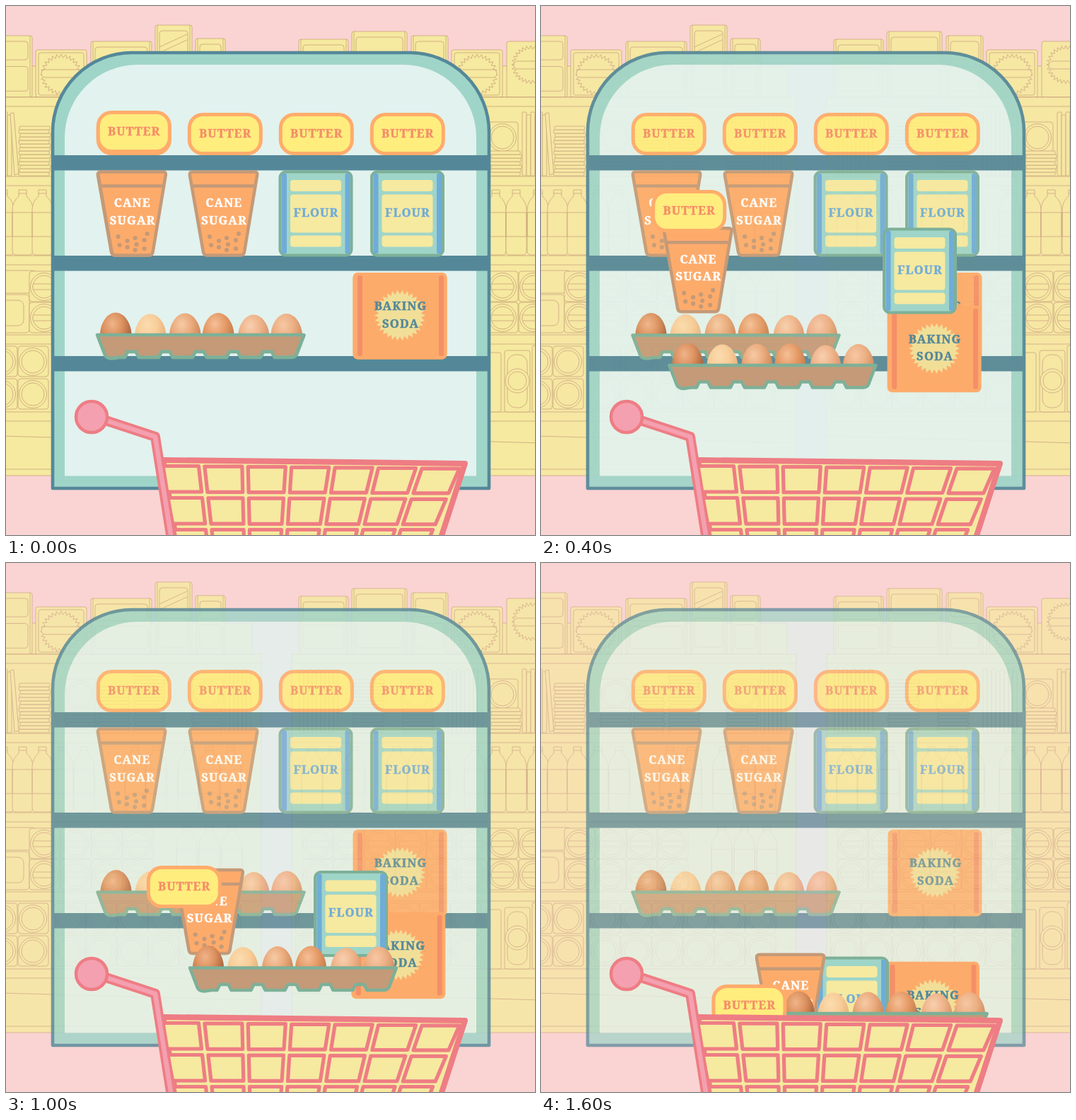
Recreate the animation shown at these times as an HTML page. Size 748 px wide and 748 px high, loop 1.7 s.

```html
<!DOCTYPE html>
<html lang="en">
<head>
<meta charset="utf-8">
<title>Baking aisle</title>
<style>
  html, body { margin: 0; height: 100%; overflow: hidden; background: #fad3d3; }
  svg { display: block; width: 748px; height: 748px; }
  text { font: bold 16.6px "Noto Serif", serif; text-anchor: middle; letter-spacing: 1.1px; stroke-width: .5; }
  .line { fill: #f6e9a0; stroke: #c9a27a; stroke-width: .8; }
</style>
</head>
<body>
<svg id="stage" viewBox="0 0 748 748"></svg>
<script>
const YELLOW = '#f6e9a0', ORANGE = '#fdab6b', TAN = '#c49a78', TEAL = '#548899',
      MINT = '#9fd5c8', GREEN = '#7db098', PINK = '#ee7d84', ROSE = '#f4a0b0';

const many = (list, draw) => list.map(draw).join('');
const range = n => [...Array(n).keys()];
const rect = (x, y, w, h, r = 3, attrs = '') =>
  `<rect x="${x}" y="${y}" width="${w}" height="${h}" rx="${r}" ${attrs}/>`;
const circle = (x, y, r, attrs = '') => `<circle cx="${x}" cy="${y}" r="${r}" ${attrs}/>`;
const path = (d, attrs = '') => `<path d="${d}" ${attrs}/>`;
const fill = (color, stroke, width) =>
  `fill="${color}"` + (stroke ? ` stroke="${stroke}" stroke-width="${width}" stroke-linejoin="round"` : '');
const label = (str, x, y, color) => `<text x="${x + .5}" y="${y + 6}" fill="${color}" stroke="${color}">${str}</text>`;
const at = (x, y, art) => `<g transform="translate(${x} ${y})">${art}</g>`;
const burst = (x, y, inner, outer, n, attrs = '') => path('M' + range(2 * n).map(i => {
  const r = i % 2 ? inner : outer, a = i * Math.PI / n;
  return `${(x + r * Math.cos(a)).toFixed(1)} ${(y + r * Math.sin(a)).toFixed(1)}`;
}).join('L') + 'Z', attrs);

// Groceries, drawn at their place on the shelf
const butter = rect(130.3, 153.5, 101, 55, 19, fill('#ffed7e', '#ffac6b', 5)) +
  label('BUTTER', 180.7, 179.5, '#f48f68');

const sugar = path('M134 234.500H222Q226 234.500 225 240L207 348Q206 352.500 202 352.500H154Q150 352.500 149 348L130 240Q129 234.500 134 234.500Z',
    fill(ORANGE, TAN, 4.5)) + path('M132 254.500H223', fill('none', TAN, 4.5)) +
  many([[158, 326], [171, 332], [182, 328], [199, 322], [160, 338], [184, 337], [195, 331], [171, 341], [182, 345], [195, 343]],
    ([x, y]) => circle(x, y, 3.1, fill(TAN))) +
  label('CANE', 177.7, 278, '#fff') + label('SUGAR', 178, 302.500, '#fff');

const flour = rect(387.5, 234.5, 101, 118, 8, fill(MINT, GREEN, 4)) +
  many([390, 479.5], x => rect(x, 237, 7, 113, 2, fill('#6facd8'))) +
  many([[246, 16], [266.5, 54], [324.5, 16]], ([y, h]) => rect(402, y, 72, h, 4, fill(YELLOW))) +
  label('FLOUR', 438, 291.5, '#6facd8');

const soda = rect(490.5, 377, 133, 122.5, 7, fill(ORANGE)) +
  many([497, 612], x => rect(x, 381, 7, 114, 3, fill('#f48f68'))) +
  burst(557, 437.5, 30, 36, 30, fill('#f1df98')) +
  label('BAKING', 557.5, 424, TEAL) + label('SODA', 557.5, 448.5, TEAL);

const shells = [['#f0b48a', '#dc915f', '#a9623c'], ['#fbdcb0', '#f8cd99', '#e8b27c'], ['#f6cba6', '#eaaa7c', '#cd8657'],
                ['#f5c098', '#e69c68', '#c47c4c'], ['#f8d0b0', '#efb48a', '#d6946a'], ['#f6c8a4', '#edb085', '#d08e62']];
const gradients = many(shells, (tones, i) => `<radialGradient id="shell${i}" cx=".4" cy=".3" r=".65">` +
  many(tones, (c, j) => `<stop offset="${j * .5}" stop-color="${c}"/>`) + '</radialGradient>');
const eggs = many([[155.5, 434], [204.5, 436], [253.5, 435], [300.5, 434.5], [350.5, 437], [397, 435.5]], ([x, y], i) =>
    path(`M${x} ${y}c13 0 22 17 22 31s-9 22-22 22s-22-8-22-22s9-31 22-31Z`, `fill="url(#shell${i})"`)) +
  path('M129.500 465.500L140 493Q142 498.500 150 498.500L160 497' +
    many(range(5), i => `L${168 + 48 * i} 497l4-8h12l4 8`) + 'H402Q409 497 411 493L421.500 465.500Z', fill(TAN, GREEN, 4.5));

// Store shelving in the background
const box = (x, y, w, bottom) => {
  const h = bottom - y;
  return rect(x, y, w, h) + rect(x + 6, y + 8, w - 12, h * .3, 4) + rect(x + 6, y + h * .5, w - 12, h * .4, 4) +
    path(`M${x + 3} ${y}v${h}M${x + w - 3} ${y}v${h}`);
};
const starBox = x => rect(x, 62, 72, 67) + rect(x + 4, 66, 64, 60) +
  burst(x + 36, 97, 24, 29, 28) + rect(x + 8, 90, 56, 11, 5);
const bottle = x => path(`M${x + 7} 260h11v9q9 8 9 19v58q0 6-5 6h-19q-5 0-5-6v-58q0-11 9-19ZM${x + 7} 265h11M${x - 2} 292h29v34h-29Z`);
const ring = (x, y, bar) => rect(x - 21, y - 22, 43, 43, 4) + circle(x, y, 19.5) + circle(x, y, 16) +
  (bar ? rect(x - 16, y - 4, 32, 8, 1) : '');
const stack = (x, y) => many(range(Math.ceil((240 - y) / 5)), i => rect(x + i % 3, 235 - 5 * i, 43, 5, 1));
const books = (x, n) => many(range(n), i => rect(x + 6 * i, 150 + 4 * (i % 2), 6, 90 - 4 * (i % 2), 1));
const bay = (x0, x1) => rect(x0, 129, x1 - x0, 535, 0) +
  many([129, 241, 353, 465, 574], y => rect(x0, y, x1 - x0, 13, 0)) +
  path(`M${x0} 608L${x1} 618M${x0} 655H${x1}`);

const shelving = '<g class="line">' +
  rect(-9, 85, 53, 44) + rect(108, 85, 240, 44) + rect(414, 85, 330, 44) +
  box(-30, 42, 67, 129) + starBox(42) + box(120, 50, 86, 129) + box(211, 27, 52, 129) + path('M217 58L256 40M217 66L256 48') +
  box(268, 46, 42, 129) + box(414, 47, 70, 129) + box(489, 36, 78, 129) + box(573, 42, 52, 129) + starBox(630) +
  rect(708, 50, 60, 79) + burst(742, 83, 22, 27, 28) + rect(718, 78, 48, 11, 5) +
  bay(-9, 361) + bay(404, 757) +
  books(-4, 2) + path('M6 152l5-1l7 86l-6 2Z') + stack(18, 170) + many([105, 285], x => ring(x, 186)) + stack(83, 208) +
  stack(180, 155) + stack(130, 175) + stack(262, 208) + books(310, 6) + books(415, 9) + stack(490, 165) +
  ring(580, 186) + stack(560, 208) + books(625, 8) + ring(702, 186) + stack(684, 208) + books(730, 4) +
  many([-16, 11, 39, 68, 98, 170, 200, 245, 275, 305, 420, 450, 480, 540, 570, 600, 650, 680, 709, 739], bottle) +
  rect(-9, 374, 50, 32) + rect(-9, 408, 42, 54, 5) + rect(-9, 416, 34, 36, 8) +
  many([54, 98, 142, 186, 440, 484, 528, 572, 616, 658, 702, 746], x => ring(x, 397, 1) + ring(x, 441, 1)) +
  at(235, 113, bottle(8) + bottle(40) + bottle(72)) +
  many([-6, 38, 90, 134, 178, 222, 266, 310, 430, 474, 518, 562, 606, 650], x => ring(x, 503) + ring(x, 549)) +
  rect(676, 490, 24, 84) + rect(705, 487, 36, 87) + rect(709, 493, 28, 75, 12) + circle(723, 530, 17) + circle(723, 530, 13) +
  rect(744, 480, 20, 94) + '</g>';

const cabinet = path('M66 682V178A112 112 0 0 1 178 66H571A112 112 0 0 1 683 178V682Z', fill(MINT, TEAL, 4.6)) +
  path('M83 664.500V186A103 103 0 0 1 186 83H562A103 103 0 0 1 665 186V664.500Z', fill('#e2f2ee')) +
  many([211, 353, 495], y => rect(66, y, 617, 21.5, 0, fill(TEAL))) +
  many([0, 129, 258, 387], x => at(x, 0, butter)) + sugar + at(130, 0, sugar) +
  flour + at(129.5, 0, flour) + eggs + soda;

// Shopping cart: evenly spaced bars that lean towards the bottom
const barX = (i, y) => 215.5 + 61.3 * i + (y - 652) * (.2 - .088 * i);
const cell = (i, row) => {
  const y0 = 650.5 + 45 * row, y1 = y0 + 36.5, tilt = .6 * i * (1 - row / 2);
  return path(`M${barX(i, y0) + 4.2} ${y0 + tilt}L${barX(i + 1, y0) - 4.2} ${y0 + tilt}` +
    `L${barX(i + 1, y1) - 4.2} ${y1 + tilt / 2}L${barX(i, y1) + 4.2} ${y1 + tilt / 2}Z`);
};
const pole = 'M135 584L211 609L234 754';
const cart = path('M222 642L649 647L611 764H242Z', fill(YELLOW, PINK, 8)) +
  `<g ${fill(YELLOW, PINK, 5.2)}>` + many(range(3), row => many(range(7), i => cell(i, row))) + '</g>' +
  path(pole, fill('none', PINK, 14)) + path(pole, fill('none', ROSE, 6.5)) +
  circle(121, 581, 22, fill(ROSE, PINK, 4.5));

// Falling goods, back to front: art, start offset, step per tick
const goods = [
  [soda, 0, 0, -.22, 11.67],
  [flour, 129.5, 0, -8, 20.25],
  [sugar, .6, 0, 10.9, 19.95],
  [eggs, -.5, -.5, 13.1, 10.75],
  [butter, 0, -3, 7.1, 28],
];

const stage = document.getElementById('stage');
stage.innerHTML = `<defs>${gradients}</defs>` +
  `<g class="fade">${shelving}</g><g class="fade">${cabinet}</g>` +
  many(goods, ([art]) => `<g class="good">${art}</g>`) + cart;
const faders = stage.querySelectorAll('.fade'), movers = stage.querySelectorAll('.good');

function draw() {
  const tick = Math.floor(performance.now() % 1700 / 100);
  faders.forEach(g => g.setAttribute('opacity', 1 - .28 * tick / 16));
  goods.forEach(([, x, y, dx, dy], i) =>
    movers[i].setAttribute('transform', `translate(${x + dx * tick} ${y + dy * tick})`));
  requestAnimationFrame(draw);
}
draw();
</script>
</body>
</html>
```
